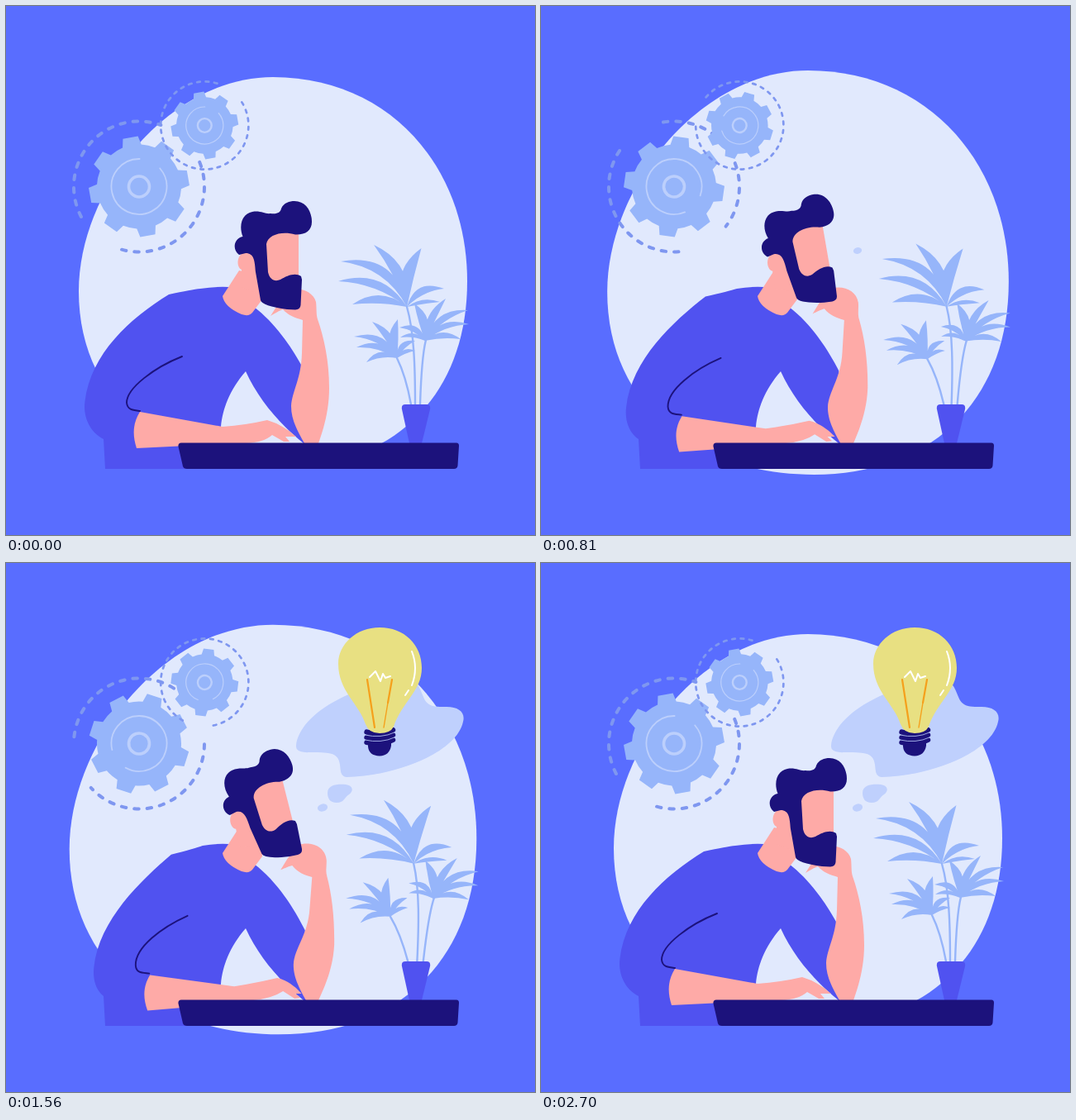
Recreate the animation shown at these times as an HTML page. Size 640 by 640 pixels, loop 2730 ms.

```html
<!DOCTYPE html>
<html lang="en">
<head>
<meta charset="utf-8">
<title>Thinking</title>
<style>
  html, body { margin: 0; height: 100%; overflow: hidden; background: #596dff; }
  svg { display: block; width: 100vw; height: 100vh; }
  .navy { fill: #1c127c; }
  .shirt { fill: #5052f0; }
  .skin { fill: #feaaa7; }
  .soft { fill: #96b5fa; }
  .cloud { fill: #bfd0fd; }
  .line { fill: none; stroke-linecap: round; stroke-linejoin: round; }
</style>
</head>
<body>
<svg viewBox="0 0 640 640">
  <path id="blob" fill="#e1e9fd" d="M323 86C463 86 558 194 558 333C558 472 468 559 330 559C192 559 88 478 88 345C88 222 197 86 323 86Z"/>

  <g id="bigGear"></g>
  <g id="smallGear"></g>

  <g id="dot"><ellipse class="cloud" cx="383" cy="296" rx="6.2" ry="4.5" transform="rotate(-15 383 296)"/></g>
  <path id="puff" class="cloud" d="M389 278C389 268 402 267 411 268C420 269 421 276 415 280C409 284 409 290 400 290C392 290 389 285 389 278Z"/>
  <path id="cloud" class="cloud" d="M351 221C355 185 410 152 478 140.5C497 139 500 150 505 162C510 175 520 174 533 174C548 174 556 181 553 192C545 230 470 258 412 259C404 258 405 251 404 244C402 226 385 230 362 229Q350 228 351 221Z"/>
  <g id="bulb">
    <path class="line" stroke="#1c127c" stroke-width="6.4" d="M436.500 204.500Q454 209 468 202M436.500 211Q454 215 468 208M436.500 217Q454 221 468 214"/>
    <path class="line" stroke="#bfd0fd" stroke-width=".8" d="M434 208Q454 212.500 470 205M434 214Q454 218.500 470 211"/>
    <path class="navy" d="M438 218Q452 222 466 216V221Q464 233 452 233.500Q439 233 438 222Z"/>
    <path fill="#e8e082" d="M452 78C482 78 503 99 503 127C503 155 479 168 469 198Q465 206 452 206Q439 206 435 195C427 170 402 155 402 122C402 98 424 78 452 78Z"/>
    <g class="line" stroke="#f5a01c"><path stroke-width="2.2" d="M437 141L446 199M467 141L462 169"/><path stroke-width="1.4" d="M462 169L457 199"/></g>
    <path class="line" stroke="#fff" stroke-width="2" d="M440 138L447 131L453 143L456 134L459 139L465 137M491 107Q499 127 491 148M487 154L483 160"/>
  </g>

  <g id="rightFrond"></g>
  <g id="leftFrond"></g>
  <g id="tallFrond"></g>
  <path class="shirt" d="M483 482H509Q514 482 513 488L503 529H488L479 488Q478 482 483 482Z"/>

  <path id="torso" class="shirt"/>
  <path id="crease" class="line" stroke="#1c127c" stroke-width="1.9"/>
  <path class="skin" d="M262 351L282 320L309 326L310 355L298 371Q294 376 285 373Q264 364 262 351Z"/>
  <path id="proppedArm" class="skin"/>
  <g id="head">
    <path class="skin" d="M312 290L322 272L354 272V328L335 336L312 334Z"/>
    <path class="skin" d="M290 298L303 300L310 350L284 340L285 319C278 316 279 299 290 298Z"/>
    <path class="navy" d="M349 236C363 236 370 249 370 261C370 272 362 277 350 276.500C335 272 317 276 315 288L317 322C319 331 325 334 332 331C340 326 350 322 357 327L358 331L356.500 362Q356 367 350 367.500L340 367Q310 363 308 356L302 322C301 308 300 299 290 299L282 301C273 294 276 281 286.500 279C281 265 286 251 298 249C308 247 313 252 320 251C328 252 332 250 333 245C336 238 343 236 349 236Z"/>
  </g>
  <path id="restingArm" class="skin"/>
  <path class="navy" d="M212 528.500H545Q548 528.500 548 532L546.500 556Q546 560 542 560H219Q215 560 214 557L208.500 533Q208 528.500 212 528.500Z"/>
</svg>
<script>
const LOOP = 2730, STEP = 30, TURN = 2700;
const $ = id => document.getElementById(id);
const clamp = v => Math.min(1, Math.max(0, v));
const transform = (id, value) => $(id).setAttribute('transform', value);

const polar = (r, deg) => {
  const a = deg * Math.PI / 180;
  return `${(r * Math.cos(a)).toFixed(2)} ${(r * Math.sin(a)).toFixed(2)}`;
};
const arc = (r, from, to) =>
  `M${polar(r, from)}A${r} ${r} 0 ${+(to - from > 180)} 1 ${polar(r, to)}`;

function buildGear(id, dashes) {
  let teeth = '';
  for (let a = -100; a < 260; a += 45) {
    teeth += `${teeth ? 'L' : 'M'}${polar(51, a - 13)}L${polar(61, a - 8.7)}L${polar(61, a + 8.7)}` +
      `L${polar(51, a + 13)}A51 51 0 0 1 ${polar(51, a + 32)}`;
  }
  const dashed = dashes.map(([from, to]) => arc(79, from, to)).join('');
  $(id).innerHTML = `
    <path class="line" stroke="#7f97f0" stroke-width="4" stroke-dasharray="5.5 9.95" d="${dashed}"/>
    <path class="soft" d="${teeth}Z"/>
    <g class="line" stroke="#bccffc">
      <path stroke-width="1.8" d="${arc(33.5, -41, 271)}"/>
      <circle r="12.5" stroke-width="3.6"/>
    </g>`;
}

// A leaf is two curves from hub to tip, bowed sideways by bend.
function leaf([x, y], [tipX, tipY, bend, width]) {
  const dx = tipX - x, dy = tipY - y, len = Math.hypot(dx, dy);
  const control = k => `${(x + tipX) / 2 - dy / len * k} ${(y + tipY) / 2 + dx / len * k}`;
  return `M${x} ${y}Q${control(bend + width)} ${tipX} ${tipY}Q${control(bend - width)} ${x} ${y}Z`;
}
function buildFrond(id, stem, hub, leaves) {
  $(id).innerHTML = `<path class="line" stroke="#96b5fa" stroke-width="2.4" d="${stem}"/>
    <path class="soft" d="${leaves.map(l => leaf(hub, l)).join('')}"/>`;
}

buildGear('bigGear', [[-22, 107], [152.5, 289.5]]);
buildGear('smallGear', [[-32, 290]]);
buildFrond('tallFrond', 'M495 500V482C495 440 494 395 485 364', [485, 364], [
  [405, 309, 36, 11], [445, 289, 19, 13], [502.5, 293, -16, 15], [402, 333, 24, 10],
  [419, 361, 15, 10], [530, 342, -18, 9], [525, 358, -6, 5]]);
buildFrond('rightFrond', 'M501 500V482C502 450 504 420 508 404', [507, 405], [
  [494, 360, 9, 11], [532, 354, -9, 9], [559, 368, -18, 8], [560, 385, -16, 7],
  [550, 403, -11, 7], [476, 389, 13, 7], [477, 401, 9, 5]]);
buildFrond('leftFrond', 'M492 500L490 482C486 460 481 442 473 426', [473, 426], [
  [443, 382, 11, 9], [474, 379, -9, 11], [421, 400, 19, 8], [424, 413, 15, 7],
  [436, 431, 13, 7], [495, 405, -11, 7], [495, 417, -7, 5]]);

// Each pair holds the upright and the leaning pose.
const poses = {
  torso: [
    'M197 349Q225 343 235 342Q255 339 270 340L300 364C325 383 345 412 357 434L362 470L362 529L360 529C330 505 305 475 290 442C270 465 262 488 260 509L250 560L120 560L118 524C100 515 93 495 95.5 478C103 420 150 378 197 349Z',
    'M200 353Q228 346 238 342Q255 339 270 340L300 364C328 385 350 420 362 445L364 470L364 529L360 529C330 505 305 475 290 442C270 465 262 488 260 509L250 560L120 560L118 524C107 515 106 500 107 490C113 432 165 384 200 353Z'],
  crease: [
    'M213 424C180 437 146 462 146 480C147 489 154 489 162 490',
    'M220 427C189 441 157 465 157.5 487C158 497 166 496 174 497'],
  proppedArm: [
    'M320 375L327 364L345 343C358 340 372 347 375 358C376 366 375 372 377 379C385 402 391 430 391 462C391 490 384 512 378 529L361 529C350 510 345 498 345 484C346 466 357 452 358 420L359 380C349 377 341 374 335 367C330 369 327 371 320 375Z',
    'M333 371L341 358L354 341C370 336 387 343 388.5 359C389 366 387 372 389 379C395 402 398 430 397.5 462C396 490 386 512 378 529L363 529C352 510 348 498 348 486C349 466 366 450 368 418L371 380C362 378 353 374 347 366C342 367 339 369 333 371Z'],
  restingArm: [
    'M162 491L262 509Q290 507 316 501Q334 506 351 521L338 521L343 527L336 527L322 519Q312 528 290 529L240 531L158 535C153 520 153 505 162 491Z',
    'M175 499L277 512.5Q304 508 329 502Q344 505 358 521L351 521L357 526L350 527L336 518Q322 527 300 529L240 536L172 542C166 525 167 512 175 499Z']
};
function mix(a, b, p) {
  const target = b.match(/[\d.]+/g);
  let i = 0;
  return a.replace(/[\d.]+/g, n => (+n + (target[i++] - n) * p).toFixed(2));
}

function pop(id, x, y, t, start, length) {
  const u = clamp((t - start) / length), s = u * u * (3 - 2 * u);
  transform(id, `translate(${x} ${y}) scale(${s}) translate(${-x} ${-y})`);
}

function draw() {
  const t = Math.floor(performance.now() % LOOP / STEP) * STEP;
  const angle = 360 * t / TURN;
  const lean = (1 - Math.cos(2 * Math.PI * t / TURN)) / 2;

  transform('blob', `translate(323 322.5) scale(${1 + 0.051 * lean}) translate(-323 -322.5)`);
  transform('bigGear', `translate(161 218.5) rotate(${angle})`);
  transform('smallGear', `translate(240.3 144.5) scale(.672) rotate(${-angle})`);
  transform('head', `rotate(${-15 * lean} 293 348)`);
  transform('tallFrond', `rotate(${3 * lean} 495 530)`);
  transform('rightFrond', `rotate(${4.8 * lean} 500 530)`);
  transform('leftFrond', `rotate(${-4.7 * lean} 492 530)`);
  for (const id in poses) $(id).setAttribute('d', mix(...poses[id], lean));

  pop('dot', 383, 296, t, 720, 120);
  pop('puff', 404, 278, t, 820, 150);
  pop('cloud', 452, 200.5, t, 960, 155);
  pop('bulb', 452, 156, t, 1110, 190);
  requestAnimationFrame(draw);
}
draw();
</script>
</body>
</html>
```
